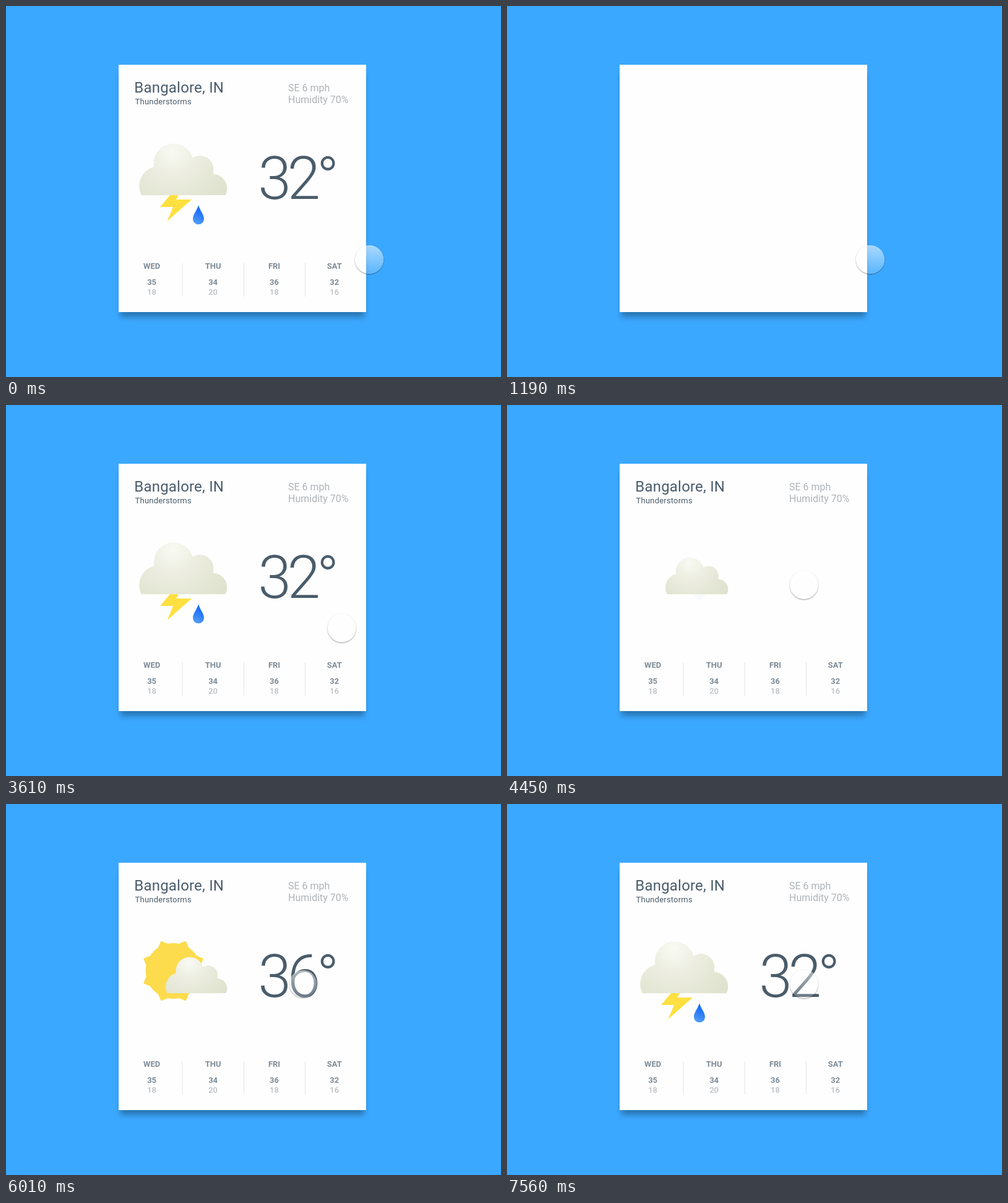
Animation, 800 px wide and 600 px high, one loop 7.83 s. Source, as an HTML page:

```html
<!DOCTYPE html>
<html lang="en">
<head>
<meta charset="utf-8">
<title>Weather card</title>
<style>
  html, body { margin: 0; width: 100%; height: 100%; overflow: hidden; background: #fefefe; }
  #stage { position: relative; width: 800px; height: 600px; overflow: hidden; background: #fefefe; }
  #scene { position: absolute; inset: 0; background: #3ba8ff; }
  #card {
    position: absolute; left: 182px; top: 95px; width: 400px; height: 400px;
    background: #fefefe; box-shadow: 0 11px 9px -3px rgba(0, 0, 0, .3);
  }
  svg { position: absolute; left: 0; top: 0; }
  text { font-family: Roboto, sans-serif; fill: #4a5c6b; }
  .city { font-size: 24px; letter-spacing: .2px; }
  .sky { font-size: 13px; letter-spacing: .2px; }
  .air { font-size: 16px; fill: #afb3b7; }
  .temp { font-size: 96px; font-weight: 300; letter-spacing: -6px; }
  .day { font-size: 13px; font-weight: 700; text-anchor: middle; fill: #7d8b97; }
  .low { font-size: 13px; font-weight: 500; text-anchor: middle; fill: #bbc0c5; }
  #cursor {
    position: absolute; left: -23px; top: -23px; width: 46px; height: 46px; border-radius: 50%;
    background: linear-gradient(rgba(255, 255, 255, .56), rgba(255, 255, 255, .16));
    box-shadow: 0 1px 2px rgba(0, 0, 0, .42), inset 0 0 1px rgba(255, 255, 255, .8);
  }
</style>
</head>
<body>
<div id="stage">
  <div id="scene">
    <div id="card"></div>
    <svg width="800" height="600" viewBox="0 0 800 600">
      <defs>
        <radialGradient id="mist" gradientUnits="userSpaceOnUse" cx="270" cy="234" r="105">
          <stop offset="0" stop-color="#f8f9f2"/>
          <stop offset=".18" stop-color="#f3f4ea"/>
          <stop offset=".4" stop-color="#ecede0"/>
          <stop offset=".65" stop-color="#e6e8d7"/>
          <stop offset="1" stop-color="#dfe2ce"/>
        </radialGradient>
        <linearGradient id="water" x1=".6" y1="0" x2=".35" y2="1">
          <stop offset="0" stop-color="#0f62ff"/>
          <stop offset=".5" stop-color="#2c7cfb"/>
          <stop offset="1" stop-color="#559ff5"/>
        </linearGradient>
        <clipPath id="above"><rect x="200" y="200" width="170" height="106"/></clipPath>
        <clipPath id="below"><rect x="200" y="306" width="170" height="90"/></clipPath>
      </defs>
      <g id="header">
        <text class="city" x="207.3" y="140">Bangalore, IN</text>
        <text class="sky" x="208.6" y="159">Thunderstorms</text>
        <text class="air" x="456" y="138">SE 6 mph</text>
        <text class="air" x="456" y="157">Humidity 70%</text>
      </g>
      <path id="sun" fill="#fcdc4c"/>
      <g clip-path="url(#below)">
        <path id="bolt" fill="#ffe040" d="M265 306H279L275 313H300L260.500 348L270 325H249Z"/>
        <path id="drop" fill="url(#water)" d="M311 322C313 330 320 337 320 344.300A9 9 0 0 1 302 344.300C302 337 309 330 311 322Z"/>
      </g>
      <g id="cloud" clip-path="url(#above)" fill="url(#mist)">
        <circle cx="247.300" cy="291" r="32"/>
        <circle cx="313.300" cy="264" r="22"/>
        <circle cx="334" cy="295" r="23.300"/>
        <circle cx="270.700" cy="254.500" r="32"/>
        <rect x="245" y="262" width="90" height="44"/>
      </g>
      <text id="temp" class="temp" x="407.500" y="312">32°</text>
      <g id="week"></g>
    </svg>
  </div>
  <div id="cursor"></div>
</div>
<script>
const LOOP = 7830;
const $ = id => document.getElementById(id);
const clamp = p => Math.min(1, Math.max(0, p));

// Start value, then steps of [start, duration, value]
const tracks = {
  header: [0, [1310, 400, 1]],
  week: [0, [1450, 640, 1]],
  cloud: [0, [1310, 620, 1], [4130, 500, .7], [6310, 720, 1]],
  bolt: [0, [1650, 640, 1], [4130, 500, 0], [6760, 640, 1]],
  drop: [0, [1740, 550, 1], [4130, 500, 0], [6900, 650, 1]],
  temp: [0, [1660, 620, 1], [4130, 310, 0], [4540, 900, 1], [6310, 310, 0], [6660, 890, 1]],
  sun: [0, [4540, 760, 1], [6310, 500, 0]]
};

function value(name, t) {
  const [first, ...steps] = tracks[name];
  return steps.reduce((v, [start, span, to]) =>
    v + (to - v) * (1 - (1 - clamp((t - start) / span)) ** 3), first);
}

function place(id, move, alpha) {
  $(id).setAttribute('transform', move);
  $(id).setAttribute('opacity', alpha);
}

function sunPath() {
  const point = (r, deg) => {
    const a = deg * Math.PI / 180;
    return `${(r * Math.cos(a)).toFixed(2)} ${(r * Math.sin(a)).toFixed(2)}`;
  };
  let d = '';
  for (let i = 0; i < 8; i++) {
    const a = 22.5 + 45 * i;
    d += `${i ? 'A45 45 0 0 1' : 'M'}${point(45, a - 11)}`;
    d += `L${point(51.8, a - .8)}L${point(51.8, a + .8)}L${point(45, a + 11)}`;
  }
  return d + `A45 45 0 0 1 ${point(45, 11.5)}Z`;
}

function buildWeek() {
  const days = [['WED', 35, 18], ['THU', 34, 20], ['FRI', 36, 18], ['SAT', 32, 16]];
  const centres = [235.6, 334.6, 433.5, 530.7];
  $('week').innerHTML = days.map(([day, high, low], i) => {
    const x = centres[i];
    const line = i ? `<rect x="${185.2 + 99.3 * i}" y="416" width="1" height="54" fill="#e1e4e6"/>` : '';
    return `${line}<text class="day" x="${x}" y="425">${day}</text>
      <text class="day" x="${x}" y="451">${high}</text>
      <text class="low" x="${x}" y="467">${low}</text>`;
  }).join('');
}

function moveCursor(t) {
  const p = clamp((t - 3390) / 500);
  const k = p * p * (3 - 2 * p);
  const pressed = (t >= 3900 && t < 3960) || (t >= 6010 && t < 6070);
  $('cursor').style.transform =
    `translate(${587 - 107 * k}px, ${410 - 119 * k}px) scale(${pressed ? .96 : 1})`;
}

function render(time) {
  $('scene').style.visibility = time >= 870 && time < 1190 ? 'hidden' : 'visible';
  // The loop opens on the finished card
  const t = time < 870 ? 2500 : time;
  const at = name => value(name, t);

  $('header').setAttribute('opacity', at('header'));
  place('week', `translate(0 ${12 * (1 - at('week'))})`, at('week'));
  place('cloud', `translate(357.5 306) scale(${at('cloud')}) translate(-357.5 -306)`, 1);
  for (const id of ['bolt', 'drop']) place(id, `translate(0 ${-40 * (1 - at(id))})`, at(id));

  const sun = at('sun');
  place('sun', `translate(270.6 270) rotate(${-90 * (1 - sun)}) scale(${sun})`, sun > 0 ? 1 : 0);

  $('temp').textContent = t >= 4450 && t < 6640 ? '36°' : '32°';
  place('temp', `translate(${48 * (1 - at('temp'))} 0)`, at('temp'));
  moveCursor(t);
}

$('sun').setAttribute('d', sunPath());
buildWeek();

const begin = performance.now();
function tick() {
  render((performance.now() - begin) % LOOP);
  requestAnimationFrame(tick);
}
tick();
</script>
</body>
</html>
```
